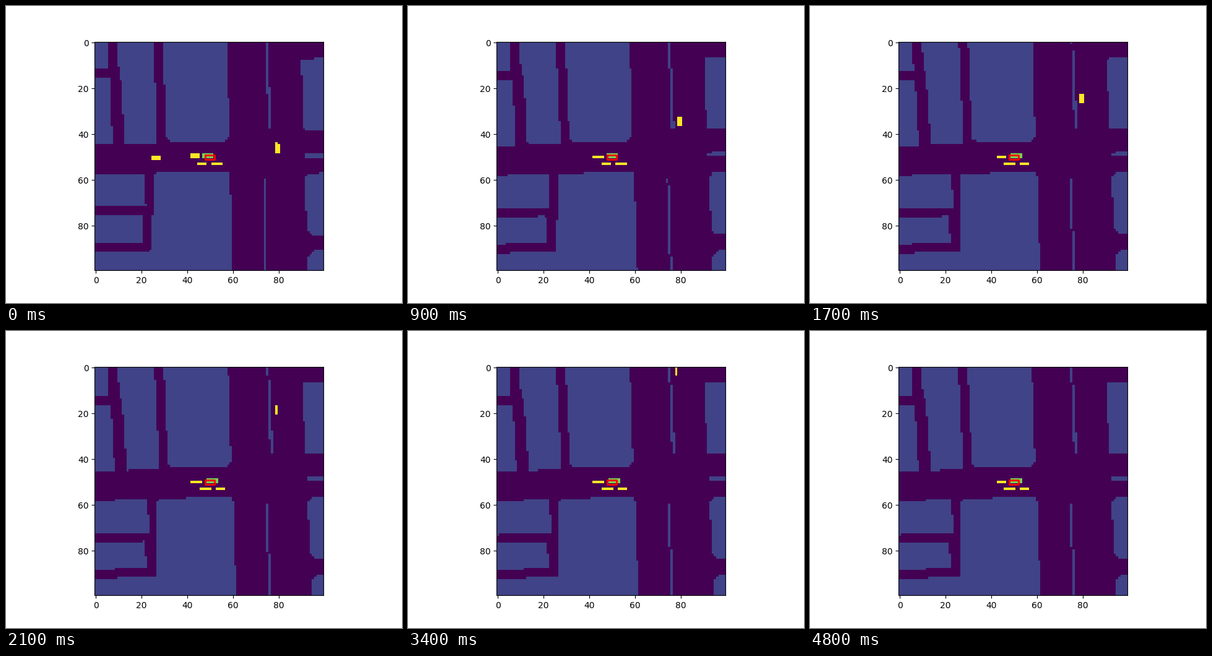
Recreate the animation shown at these times as a matplotlib script. Size 640x480 px, loop 4.9 s.

```python
import numpy as np
import matplotlib.pyplot as plt
from matplotlib.animation import FuncAnimation

SIZE, FRAMES = 100, 49
ROAD, BLOCK, EGO, CAR = 0, 1, 4, 5
FAR = 150
TILT = 0.03  # slope of the cross streets

# Left edge and right edge (x at rows 0 and 100), top, bottom, corner cut
BLOCKS = [
    (-FAR, -FAR, 6, 9, -FAR, 11.68, 0),
    (-FAR, -FAR, 6.05, 12.05, 15.5, 44.72, 0),
    (30.12, 34.88, 58.26, 61.7, -FAR, 43.97, 2.2),
    (-FAR, -FAR, 20.2, 25.3, 57.36, 72.03, .3),
    (-FAR, -FAR, 18.5, 23.4, 75.7, 87.36, .5),
    (27.8, 26.7, 58.23, 62.08, 57.23, FAR, 1),
    (-FAR, -FAR, 40, 40, 91.39, FAR, 0),
    (90.25, 95.25, FAR, FAR, 8.35, 39.55, 1),
    (89.5, 95.5, FAR, FAR, 58.41, 85.54, 2.2),
    (94.9, 94.9, FAR, FAR, 92.24, FAR, 2.8),
]
# Two median strips and the crossing island
STRIPS = [
    (75.23, 79.08, 76.12, 80.88, -FAR, 38.78, 0),
    (72.59, 76.27, 73.62, 77.22, 60.75, FAR, 0),
    (92.6, 92.6, FAR, FAR, 49.68, 51.48, 0),
]
# The one block whose left edge bends
BENT = (9, 9, 26.12, 30.88, -FAR, 44.54, 0)
BEND_Y, BEND_X = [-9, 10, 14, 22, 37, 46], [9.7, 10.5, 11.5, 12.5, 13.5, 13.9]

# Viewer pose: frame, rotation, shift x, shift y
POSE = [(0, .016, -1.03, -.2), (9, .004, -.33, -.03), (17, .004, .03, 0),
        (26, 0, 0, 0), (34, 0, 0, 0), (41, .004, .03, 0), (48, 0, 0, 0)]

# Vehicles: value, length, width, heading in degrees, track of (frame, x, y)
PARKED = [
    (EGO, 5, 1.7, 0, [(0, 51.02, 50)]),
    (CAR, 4.1, 1.2, 0, [(0, 48.46, 53.5)]),
    (CAR, 4.48, 1.2, 0, [(0, 54.76, 53.5)]),
]
MOVING = [
    (CAR, 4.4, 1.2, 0, [(0, 45.03, 50.25), (9, 44.83, 50.25),
                        (26, 44.5, 50.25), (41, 44.5, 50.25), (48, 45, 50.25)]),
    (CAR, 4.2, 1.6, 0, [(0, 28.05, 51.55), (9, -2.5, 51.9)]),
    (CAR, 4, 1.55, 95.5, [(0, 80.97, 46.27), (9, 80.27, 34.91),
                          (17, 79.87, 24.88), (26, 79, 12.55),
                          (34, 78.5, 2), (40, 78.2, -6)]),
]

cell_y, cell_x = np.mgrid[:SIZE, :SIZE] + 0.5


def at(keys, n):
    """Linear interpolation of keyed tuples at frame n."""
    k = np.array(keys, float)
    return [np.interp(n, k[:, 0], col) for col in k[:, 1:].T]


def block_mask(x, y, l0, l1, r0, r1, top, bottom, cut):
    t = y / 100
    v = y + TILT * (x - 50)
    dx = np.minimum(x - l0 - (l1 - l0) * t, r0 + (r1 - r0) * t - x)
    dy = np.minimum(v - top, bottom - v)
    return (dx > 0) & (dy > 0) & (dx + dy > cut)


def car_mask(x, y, cx, cy, length, width, heading):
    c, s = np.cos(np.radians(heading)), np.sin(np.radians(heading))
    along = (x - cx) * c + (y - cy) * s
    side = (y - cy) * c - (x - cx) * s
    return (abs(along) < length / 2) & (abs(side) < width / 2)


def occupancy(n):
    a, tx, ty = at(POSE, n)
    x = cell_x - tx + a * (cell_y - 50)
    y = cell_y - ty - a * (cell_x - 50)

    grid = np.full((SIZE, SIZE), ROAD)
    for shape in BLOCKS + STRIPS:
        grid[block_mask(x, y, *shape)] = BLOCK
    grid[block_mask(x, y, *BENT) & (x > np.interp(y, BEND_Y, BEND_X))] = BLOCK
    for value, length, width, heading, track in PARKED + MOVING:
        grid[car_mask(x, y, *at(track, n), length, width, heading)] = value
    return grid


fig, ax = plt.subplots(figsize=(6.4, 4.8), dpi=100)
image = ax.imshow(occupancy(0), cmap="viridis", vmin=ROAD, vmax=CAR)
ax.plot([48, 52, 52, 48, 48], [49, 49, 51, 51, 49], color="red", lw=2)
ax.set(xlim=(-0.5, SIZE - 0.5), ylim=(SIZE - 0.5, -0.5))


def update(n):
    image.set_data(occupancy(n))
    return [image]


anim = FuncAnimation(fig, update, frames=FRAMES, interval=100,
                     repeat=True, repeat_delay=0)
plt.show()
```
